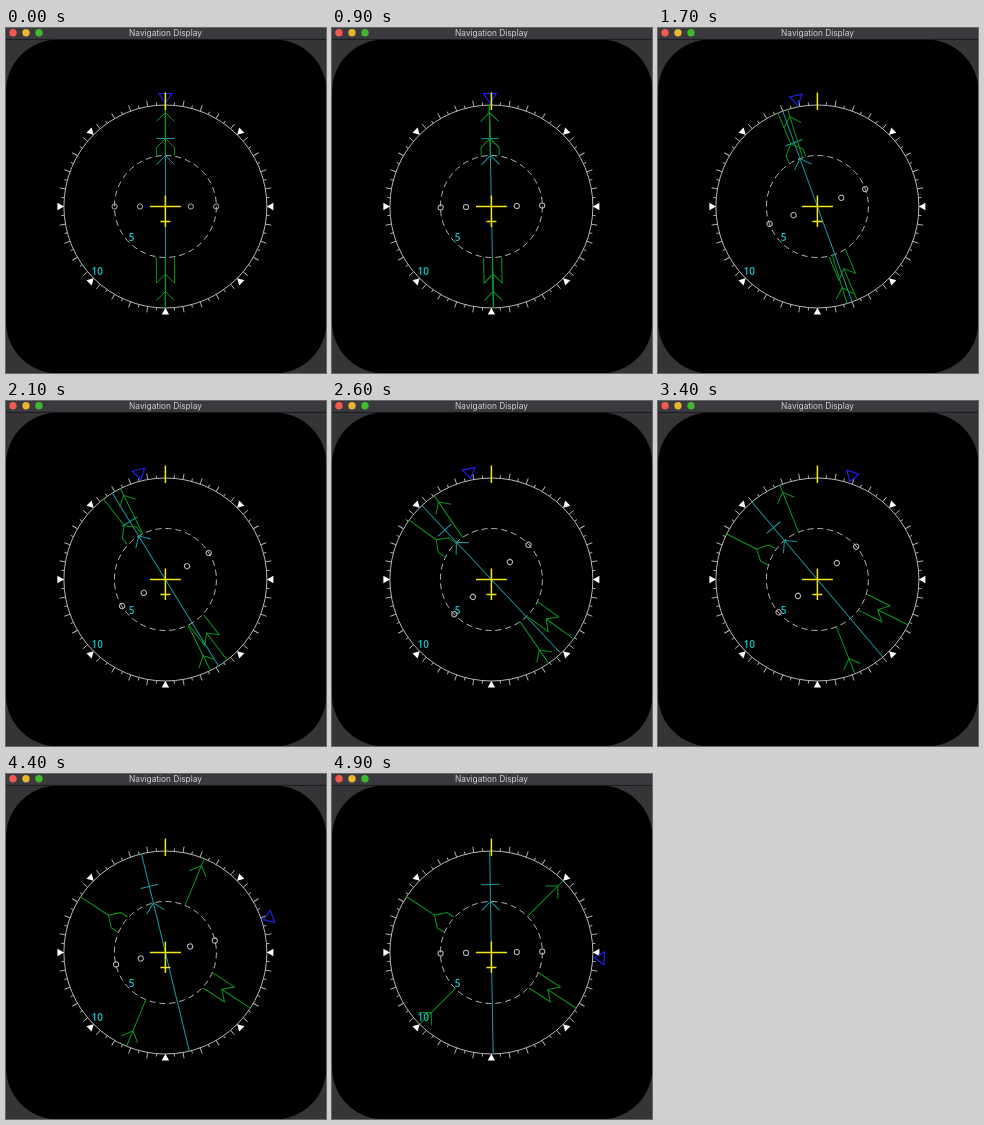
An HTML page with a canvas that plays this animation: 320 px wide and 345 px high, repeating every 5 s.

```html
<!DOCTYPE html>
<html lang="en">
<head>
<meta charset="utf-8">
<title>Navigation Display</title>
<style>
html, body { margin: 0; width: 100%; height: 100%; overflow: hidden; background: #353538; }
canvas { display: block; }
</style>
</head>
<body>
<canvas id="stage"></canvas>
<script>
const W = 320, H = 345, CX = 159.4, CY = 178.5, R = 101.5, INNER = 51;
const GREEN = '#0b9722', CYAN = '#1b9ca0', YELLOW = '#f2e619', WHITE = '#b8b8b8';
const canvas = document.getElementById('stage');
const ctx = canvas.getContext('2d');
const dpr = window.devicePixelRatio || 1;
canvas.width = W * dpr;
canvas.height = H * dpr;
canvas.style.width = W + 'px';
canvas.style.height = H + 'px';

// Needle angles in degrees at a few times in seconds
const times = [0.8, 0.9, 1.7, 2.6, 3.4, 4, 4.9];
const angles = {
  course:   [0, -1.1, -20, -43.2, -40.2, -23.9, -1],
  bearing1: [0, -1.2, -17, -34.3, -21.7, 4.6, 45],
  bearing2: [0, -1.3, -23, -54.2, -63.4, -57.6, -56.7],
  heading:  [0, -0.7, -11, -11.6, 18.3, 53, 92.9]
};

// Smooth cubic curve through the key angles
function angleAt(v, t) {
  const last = times.length - 1;
  if (t <= times[0]) return v[0];
  if (t >= times[last]) return v[last];
  let i = 0;
  while (t > times[i + 1]) i++;
  const slope = k => {
    const a = Math.max(k - 1, 0), b = Math.min(k + 1, last);
    return (v[b] - v[a]) / (times[b] - times[a]);
  };
  const d = times[i + 1] - times[i], u = (t - times[i]) / d, w = 1 - u;
  return v[i] * w * w * (1 + 2 * u) + v[i + 1] * u * u * (3 - 2 * u)
    + d * u * w * (slope(i) * w - slope(i + 1) * u);
}

// Polyline from x, y pairs
function line(color, width, ...p) {
  ctx.strokeStyle = color;
  ctx.lineWidth = width;
  ctx.beginPath();
  for (let i = 0; i < p.length; i += 2) ctx.lineTo(p[i], p[i + 1]);
  ctx.stroke();
}

function circle(x, y, r) {
  ctx.beginPath();
  ctx.arc(x, y, r, 0, 2 * Math.PI);
}

function text(str, x, y, font, color) {
  ctx.font = font;
  ctx.fillStyle = color;
  ctx.fillText(str, x, y);
}

// Draws around the dial centre, turned clockwise; up is negative y
function turned(deg, draw) {
  ctx.save();
  ctx.translate(CX, CY);
  ctx.rotate(deg * Math.PI / 180);
  draw();
  ctx.restore();
}

function drawWindow() {
  ctx.fillStyle = '#353538';
  ctx.fillRect(0, 0, W, H);
  ctx.fillStyle = '#3a393d';
  ctx.fillRect(0, 0, W, 11);
  ctx.fillStyle = '#000';
  ctx.beginPath();
  ctx.roundRect(0, 11.5, W + 0.5, H - 11, 52);
  ctx.fill();
  line('#161618', 0.8, 0, 11.4, W, 11.4);
  ['#f4594f', '#e8b431', '#40b82f'].forEach((color, i) => {
    ctx.fillStyle = color;
    circle(7 + 13 * i, 4.7, 3.7);
    ctx.fill();
  });
  text('Navigation Display', 159.5, 5.3, '8.3px Inter, sans-serif', '#cfcfcf');
}

function drawDial() {
  ctx.strokeStyle = WHITE;
  ctx.lineWidth = 1;
  circle(CX, CY, R);
  ctx.stroke();
  ctx.setLineDash([6, 4]);
  circle(CX, CY, INNER);
  ctx.stroke();
  ctx.setLineDash([]);
  for (let a = 0; a < 360; a += 5) {
    turned(a, () => line(WHITE, 0.9, 0, -R, 0, -R - (a % 10 ? 3 : 6)));
  }
  for (let a = 45; a < 360; a += 45) turned(a, () => {
    ctx.fillStyle = '#fff';
    ctx.beginPath();
    ctx.moveTo(0, -R);
    ctx.lineTo(-3.7, -R - 6.5);
    ctx.lineTo(3.7, -R - 6.5);
    ctx.fill();
  });
  const font = '600 10px "Open Sans", sans-serif';
  text('5', 125.5, 210, font, '#14c4c8');
  text('10', 91.3, 244.8, font, '#14c4c8');
}

function drawCourse() {
  line(CYAN, 1, 0, -R, 0, R);
  line(CYAN, 1, -9, -68, 9, -68);
  line(CYAN, 1, -9, -42, 0, -INNER, 9, -42);
  ctx.strokeStyle = WHITE;
  ctx.lineWidth = 1;
  for (const x of [-50.8, -25.4, 25.4, 50.8]) {
    circle(x, 0, 2.6);
    ctx.stroke();
  }
}

function drawBearing1() {
  line(GREEN, 1, 0, -R, 0, -INNER);
  line(GREEN, 1, -9, -85, 0, -94, 9, -85);
  line(GREEN, 1, 0, INNER, 0, R);
  line(GREEN, 1, -9, 94, 0, 85, 9, 94);
}

function drawBearing2() {
  line(GREEN, 1, 0, -R, 0, -68);
  line(GREEN, 1, -9, -INNER, -9, -59, 0, -68, 9, -59, 9, -INNER);
  line(GREEN, 1, -9, INNER, -9, 76.5, 0, 67.5, 9, 76.5, 9, INNER);
  line(GREEN, 1, 0, 67.5, 0, R);
}

function drawPlane() {
  line(YELLOW, 1.5, 0, -114, 0, -96.5);
  line(YELLOW, 1.5, -15.5, 0, 15.5, 0);
  line(YELLOW, 1.5, 0, -11, 0, 20.5);
  line(YELLOW, 1.5, -5, 15, 5, 15);
}

function frame(now) {
  // The display refreshes ten times a second
  const t = Math.floor(now % 5000 / 100) / 10;
  const at = name => angleAt(angles[name], t);
  ctx.setTransform(dpr, 0, 0, dpr, 0, 0);
  ctx.textAlign = 'center';
  ctx.textBaseline = 'middle';
  drawWindow();
  drawDial();
  turned(at('course'), drawCourse);
  turned(at('bearing1'), drawBearing1);
  turned(at('bearing2'), drawBearing2);
  turned(at('heading'), () =>
    line('#1c22e8', 1.2, 0, -103, -6.3, -113, 6.3, -113, 0, -103));
  turned(0, drawPlane);
  requestAnimationFrame(frame);
}
requestAnimationFrame(frame);
</script>
</body>
</html>
```
